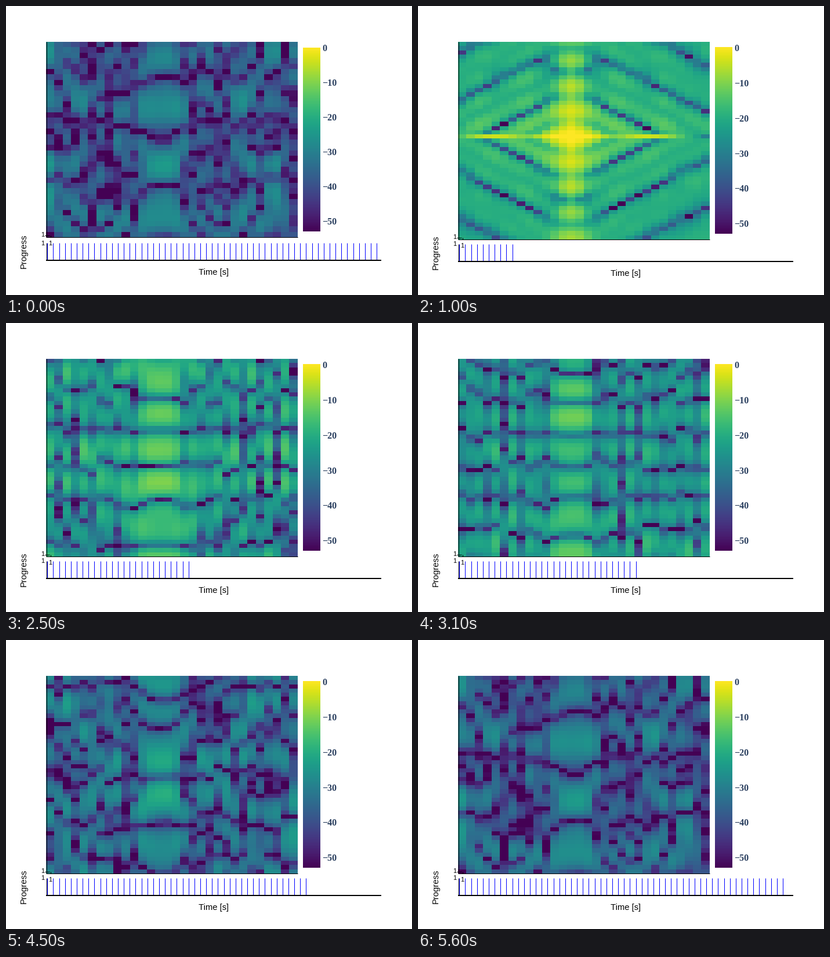
These frames come from a looping animation (700x500 px, 5700 ms). A matplotlib script:

```python
import numpy as np
import matplotlib.pyplot as plt
from matplotlib.animation import FuncAnimation

W, H, DPI = 700, 500, 100
FRAMES, INTERVAL = 57, 100
COLS, ROWS, LOW = 30, 47, -53
MID = 13                      # column of the main lobe
OPEN, SETTLED = 10, 19        # steps between which the bands take over
INK, BLUE, LABEL = "black", "#0000ff", "#2a3f5f"

rng = np.random.default_rng(12)
WAVES = list(zip(rng.uniform(.3, 1.7, 26), rng.uniform(.1, .75, 26),
                 rng.uniform(0, 2 * np.pi, 26), rng.normal(0, .07, 26),
                 rng.normal(0, .28, 26)))


def amp(db):
    return 10 ** (db / 20)


def bump(x, width, power=2):
    return np.exp(-np.abs(x / width) ** power)


def texture(x, y, step):
    """Slowly drifting standing waves, less even in x as time goes on."""
    u = x * np.abs(x) / (np.abs(x) + 1.5)
    skew = .5 * step / FRAMES
    return sum(a * (np.cos(kx * u) + skew * np.sin(kx * u))
               * np.cos(ky * y + phase + drift * step)
               for kx, ky, phase, drift, a in WAVES)


def opening(x, y, step):
    """Diamond-shaped sinc lobe with a bright ridge on either axis."""
    dy = y - 22
    s = (np.abs(x) + np.abs(dy)) * step
    row = bump(dy, .6) * (.45 + .25 * np.cos(np.pi * x / 5)) * bump(x, 15, 4)
    col = bump(x, 1.9) * (.42 + .2 * np.cos(np.pi * dy / 3)) * bump(dy, 34)
    fill = .1 * np.sin(np.pi * s / 110)
    return np.sinc(s / 55) + amp(-30) * texture(x, y, step) + 1j * (row + col + fill)


def banded(x, y, step):
    """Fading bands with a wide central lobe and rippled flanks."""
    age = (step - SETTLED) / (FRAMES - SETTLED)
    marks = [19, 25, 37, 45, 56]
    pitch = np.interp(step, marks, [10, 9, 7, 10.7, 12.5])
    peak = np.interp(step, marks, [19, 21, 22, 30, 29])
    core = bump(x, 3.3, 4)
    flank = (1 - core) * np.cos((1.55 - .6 * age) * np.abs(x))
    bend = 2.5 * age * (1 - bump(x, 5))
    band = np.cos(np.pi * (y - peak + bend) / pitch)
    sway = .75 + .25 * np.cos(.21 * y + .3 * step)
    lobes = amp(-6 - 23 * age) * core + amp(-14 - 18 * age) * flank
    return lobes * band * sway + amp(-25 - 11 * age) * texture(x, y, step)


def field(x, y, step):
    t = np.clip((step - OPEN) / (SETTLED - OPEN), 0, 1)
    return (1 - t) * opening(x, y, step) + t * banded(x, y, step)


def levels(step, rows):
    x = np.arange(COLS)[None, :] - MID
    y = ((np.arange(rows) + .5) * ROWS / rows - .5)[:, None]
    return 20 * np.log10(np.abs(field(x, y, step)) + 1e-6)


fig = plt.figure(figsize=(W / DPI, H / DPI), dpi=DPI, facecolor="white")
ax = fig.add_axes([0, 0, 1, 1])


def line(x, y, color=INK, width=1):
    ax.plot(x, y, color=color, lw=width * 72 / DPI, solid_capstyle="butt")


def text(x, y, s, px, color=INK, font="Liberation Sans", **kw):
    kw = {"ha": "center", "va": "center", **kw}
    ax.text(x, y, s, fontsize=px * 72 / DPI, color=color, family=font, **kw)


def image(data, box):
    ax.imshow(data, extent=box, cmap="viridis", vmin=LOW, vmax=0,
              interpolation="nearest", aspect="auto")


def draw(frame):
    full = frame == 0
    step = frame or FRAMES
    bottom, base, shift = (399.5, 440, 0) if full else (403.5, 442, 2.5)
    bar_top, bar_end = (72, 390) if full else (71.6, 394)

    ax.clear()
    image(levels(step, 36 if full else ROWS), (69, 502.5, bottom + .5, 62))
    image(np.linspace(0, LOW, 256)[:, None], (512, 542, bar_end, bar_top))
    for v in range(0, -51, -10):
        y = bar_top + (bar_end - bar_top) * v / LOW
        text(545, y + .5, f"\u2212{-v}" if v else "0", 16, LABEL,
             "Liberation Serif", weight="bold", ha="left", va="center_baseline")

    line([69.5, 69.5], [62, bottom])
    line([69, 502.5], [bottom, bottom])
    line([69.5, 69.5], [base - 30, base])
    for i in range(step):
        x = np.floor(70.8 + 10.14 * i) + .5
        line([x, x], [base - 30, base], BLUE)
    line([69, 646.5], [base, base], width=2)

    tick = bottom - 3
    line([67, 75], [tick, tick])
    line([76.5, 76.5], [tick, bottom])
    text(63.5, tick - .5, "1", 11)
    text(63.5, 410.5 + shift * .6, "1", 11)
    text(76.5, 410.5 + shift * 1.6, "1", 11)
    text(358, 460.5 + shift, "Time [s]", 14.7)
    text(30.5, 424 + shift, "Progress", 14.8, rotation=90)

    ax.set_xlim(0, W)
    ax.set_ylim(H, 0)
    ax.axis("off")
    return []


anim = FuncAnimation(fig, draw, frames=FRAMES, interval=INTERVAL,
                     init_func=lambda: [], repeat=True, repeat_delay=0)
plt.show()
```
